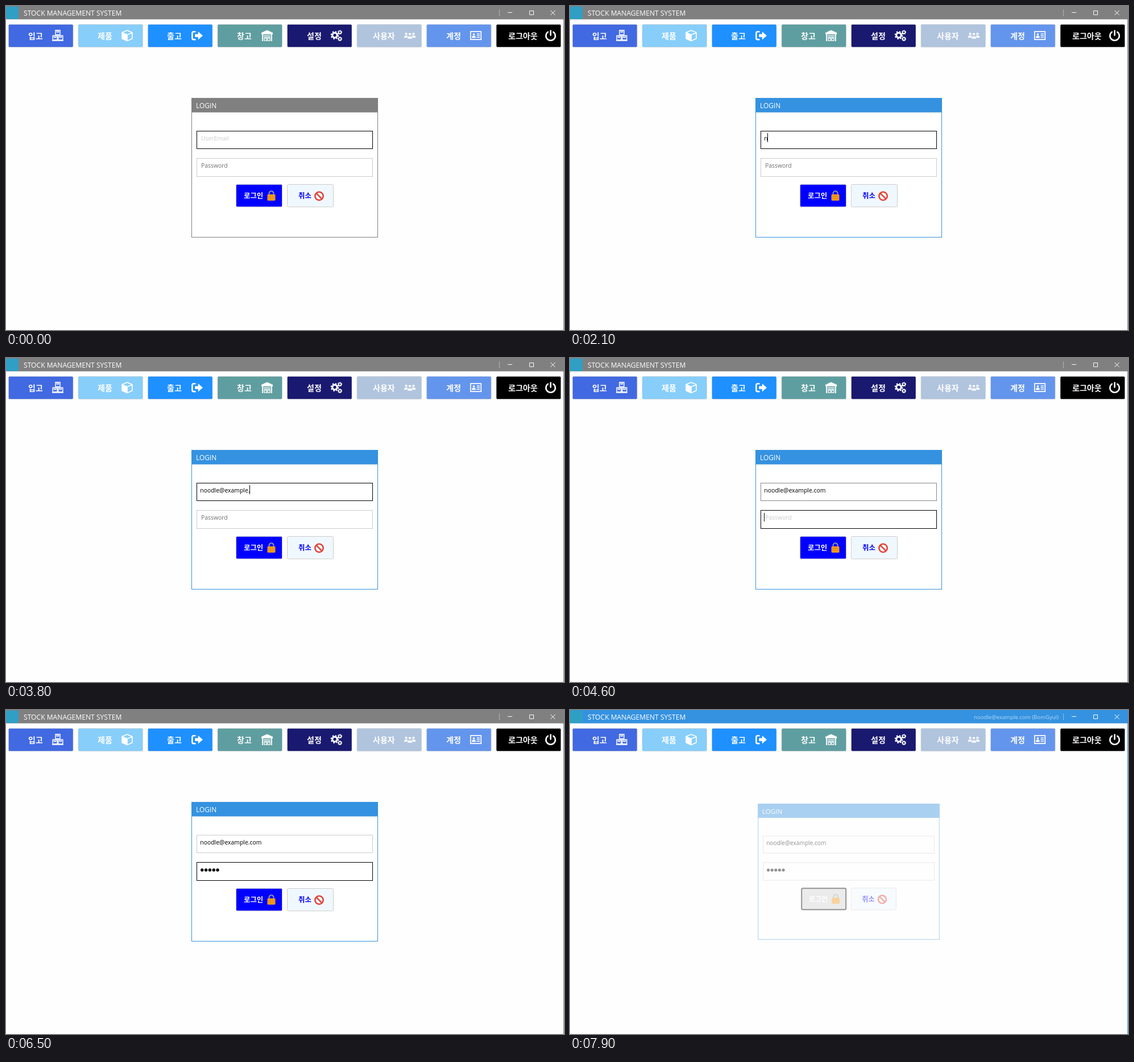
Recreate the animation shown at these times as an HTML page. Size 981 by 571 pixels, loop 8000 ms.

```html
<!DOCTYPE html>
<html lang="ko">
<head>
<meta charset="utf-8">
<title>Stock Management System</title>
<style>
  html, body { margin: 0; width: 100%; height: 100%; overflow: hidden; background: #fefefe; }
  svg { display: block; }
  text { font-family: "Open Sans", "Noto Sans", sans-serif; white-space: pre; }
  .ko { font-family: "Noto Sans CJK KR", "Noto Sans CJK", sans-serif; font-weight: 700; }
  .field { font-size: 10.4px; }
  .line { fill: none; stroke: #fff; }
</style>
</head>
<body>
<svg width="981" height="571" viewBox="0 0 981 571">
  <defs>
    <g id="crate"><path class="line" stroke-width="1.5" d="M.8.8h8v7.6h-8zM3.3.8v3.2h3V.8"/></g>
    <g id="person"><circle r="2.6"/><path d="M-4.4 8.6V6.4Q-4.4 3.6-1.8 3.6H1.8Q4.4 3.6 4.4 6.4V8.6z"/></g>
    <g id="gear" fill="none" stroke="#fff">
      <circle r="4.2" stroke-width="3"/>
      <circle r="6.3" stroke-width="2.2" stroke-dasharray="2.47 2.47"/>
    </g>
  </defs>

  <rect id="bar" width="981" height="23.5"/>
  <path id="edge" d="M980.5 23V571"/>
  <rect y="1" width="22" height="22" fill="#2f9fc4"/>
  <text x="31" y="16.5" font-size="12.1" fill="#fff">STOCK MANAGEMENT SYSTEM</text>
  <text id="user" x="859" y="15.5" font-size="9.6" fill="#b4d8f5" text-anchor="end"></text>
  <path d="M867.5 6V18" stroke="#fff" stroke-opacity=".4"/>
  <path class="line" d="M882 11.5h8M920.5 8.5h7v7h-7zM957.5 8l8 8m0-8l-8 8"/>

  <g id="nav"></g>

  <g id="login">
    <rect id="panel" x="326.5" y="162.5" width="327" height="245" fill="#fff"/>
    <rect id="header" x="326" y="162" width="328" height="25.5"/>
    <text x="334" y="180" font-size="11.9" fill="#fff">LOGIN</text>

    <rect id="emailBox" x="335.5" y="220.5" width="309" height="31" fill="none"/>
    <text id="emailHint" class="field" x="343" y="237" fill="#707070">UserEmail</text>
    <text id="email" class="field" x="341.3" y="237"></text>

    <rect id="passBox" x="335.5" y="268.5" width="309" height="32" fill="none"/>
    <text id="passHint" class="field" x="343" y="285" fill="#707070">Password</text>
    <g id="dots"></g>
    <rect id="caret" width="1"/>

    <rect id="ok" rx="2"/>
    <text class="ko" x="418" y="339" font-size="12.4" fill="#fff">로그인</text>
    <path d="M462.5 333V330.5a4 4 0 0 1 8-.6v2" fill="none" stroke="#8a9a9c" stroke-width="2"/>
    <rect x="459.5" y="332" width="14" height="11" rx="1.5" fill="#f59a1b"/>
    <path d="M460 335.5h13m-13 3.5h13" stroke="#df8510" stroke-width=".8"/>

    <rect x="494.5" y="314.5" width="81" height="39.5" rx="2" fill="#f0f8ff" stroke="#ccc"/>
    <text class="ko" x="514" y="339" font-size="12.4" fill="#00f">취소</text>
    <path d="M545.3 329.8l10.4 10.4" stroke="#e2453c" stroke-width="2.6"/>
    <circle cx="550.5" cy="335" r="7.2" fill="none" stroke="#e2453c" stroke-width="2.6"/>
  </g>
</svg>
<script>
const LOOP = 8000;
const ADDRESS = 'noodle@example.com';
const GREY = '#808080', BLUE = '#3592e0';

// label, label x, icon x, colour, icon in a 20 px box
const menu = [
  ['입고', 39, 81, 'royalblue',
    '<use href="#crate" x="5.2"/><use href="#crate" x=".4" y="9.4"/><use href="#crate" x="10" y="9.4"/><path class="line" stroke-width="1.5" d="M0 19h20"/>'],
  ['제품', 161, 203, 'lightskyblue',
    '<path d="M1 5v10.5l9 4V9z"/><path class="line" stroke-width="1.6" stroke-linejoin="round" d="M10 1l9 3.8v10.7l-9 4-9-4V4.8zM1 5l9 3.8 9-3.8M10 9v10"/>'],
  ['출고', 283, 326, 'dodgerblue',
    '<path class="line" stroke-width="2.6" d="M7.5 3.3H4Q1.4 3.3 1.4 6v8.5q0 2.6 2.6 2.6h3.5"/><path d="M6.3 7.5h5.5V3L20 10.2l-8.2 7.2v-4.6H6.3z"/>'],
  ['창고', 406, 449, 'cadetblue',
    '<path d="M0 5L10 .5 20 5v3H0z"/><path class="line" stroke-width="2" d="M2.2 7v13M17.8 7v13"/><path class="line" stroke-width="1.3" d="M4 10.5h12M5.2 13.2h4v6h-4zM11 13.2h4v6h-4zM7.2 13v3M13 13v3"/>'],
  ['설정', 529, 571, 'midnightblue',
    '<use href="#gear" x="7" y="9.5"/><use href="#gear" transform="translate(16 4.3) scale(.55)"/><use href="#gear" transform="translate(16 16) scale(.55)"/>'],
  ['사용자', 645, 700, 'lightsteelblue',
    '<use href="#person" transform="translate(3.6 7) scale(.8)"/><use href="#person" transform="translate(16.4 7) scale(.8)"/><use href="#person" x="10" y="7.5" stroke="#b0c4de"/>'],
  ['계정', 774, 816, 'cornflowerblue',
    '<path class="line" stroke-width="1.7" d="M.8 3.2h18.4v14H.8z"/><use href="#person" transform="translate(6.4 8) scale(.72)"/><path class="line" stroke-width="1.5" d="M11.5 7.3h5.5m-5.5 3h5.5m-5.5 3h5.5"/>'],
  ['로그아웃', 883, 947.5, 'black',
    '<path class="line" stroke-width="2.6" stroke-linecap="round" d="M5.3 3.8a8.2 8.2 0 1 0 9.4 0M10 1.5v8"/>']
];

const $ = id => document.getElementById(id);
const set = (id, attrs) => {
  for (const name in attrs) $(id).setAttribute(name, attrs[name]);
};

$('nav').innerHTML = menu.map(([label, x, iconX, colour, icon], i) => `
  <rect x="${4.5 + i * 122.5}" y="32.5" width="113.5" height="40" rx="2" fill="${colour}" stroke="#ccc" stroke-opacity=".6"/>
  <text class="ko" x="${x}" y="57.5" font-size="14" fill="#fff">${label}</text>
  <g fill="#fff" transform="translate(${iconX} 42)">${icon}</g>`).join('');

$('dots').innerHTML = [0, 1, 2, 3, 4]
  .map(i => `<circle cx="${344.8 + i * 6.8}" cy="282" r="2.7"/>`).join('');

// Moments at which the text lengths change
const emailKeys = [[0, 0], [1100, 1], [1800, 0], [2100, 1], [2200, 2], [2300, 3], [2400, 4],
  [2500, 5], [2700, 6], [2800, 7], [3100, 9], [3300, 10], [3400, 11], [3500, 12],
  [3600, 13], [3700, 14], [3800, 15], [4000, 16], [4100, 17], [4200, 18]];
const passKeys = [[0, 0], [4900, 1], [5100, 2], [5400, 3], [5600, 4], [5800, 5]];

const stepAt = (t, steps) => steps.findLast(([start]) => start <= t)[1];

function draw(t) {
  const active = t >= 700, signedIn = t >= 7900;
  const inPass = t >= 4400, pressed = t >= 6800, hover = t >= 6600;
  const typed = stepAt(t, emailKeys), secret = stepAt(t, passKeys);

  const frame = signedIn ? BLUE : GREY, panel = active ? BLUE : GREY;
  set('bar', { fill: frame });
  set('edge', { stroke: frame });
  set('header', { fill: panel });
  set('panel', { stroke: panel });
  $('user').textContent = signedIn ? ADDRESS + ' (BomGyul)' : '';

  $('email').textContent = ADDRESS.slice(0, typed);
  set('emailHint', { opacity: typed ? 0 : t >= 1800 && t < 1900 ? .2 : .36 });
  set('emailBox', { stroke: t >= 6500 ? '#ccc' : inPass ? '#888' : '#000' });

  set('passHint', { opacity: secret ? 0 : stepAt(t, [[0, 1], [4400, .8], [4500, .55], [4600, .36]]) });
  set('passBox', { stroke: inPass && !pressed ? '#000' : '#ccc' });
  [...$('dots').children].forEach((dot, i) => dot.setAttribute('opacity', i < secret ? 1 : 0));

  const caretOn = active && t < 6300 && !(t >= 1600 && t < 1800);
  const caretX = 341.3 + (inPass ? secret * 6.8 : typed && $('email').getComputedTextLength());
  set('caret', {
    x: Math.floor(caretX), y: inPass ? 273 : 224, height: inPass ? 15 : 16,
    opacity: caretOn ? 1 : 0
  });

  set('ok', pressed
    ? { x: 405, y: 315, width: 80, height: 38.5, fill: '#d3d3d3', stroke: '#000', 'stroke-width': 2 }
    : { x: 404.5, y: 314.5, width: 81, height: 39.5, fill: hover ? '#d3d3d3' : '#00f', stroke: '#ccc', 'stroke-width': 1 });

  set('login', {
    opacity: signedIn ? .42 : 1,
    transform: signedIn ? 'translate(490 285) scale(.974) translate(-490 -285)' : ''
  });
}

function tick() {
  draw(performance.now() % LOOP);
  requestAnimationFrame(tick);
}
tick();
</script>
</body>
</html>
```
